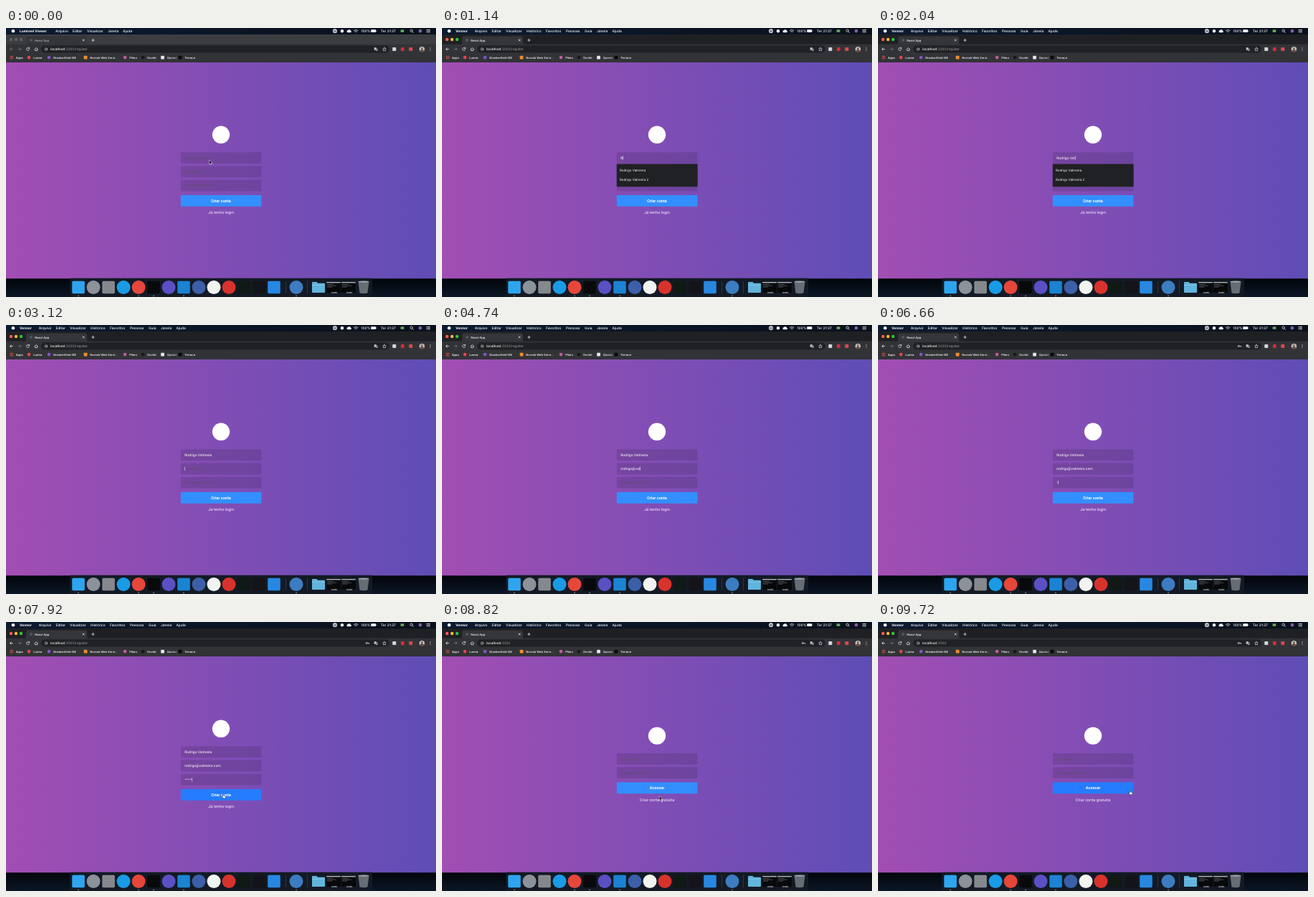
An HTML page for the animation above (9780 ms loop, 600 by 375 pixels).

```html
<!DOCTYPE html>
<html lang="pt-BR">
<head>
<meta charset="utf-8">
<title>Cadastro</title>
<style>
  html, body { margin: 0; width: 100%; height: 100%; overflow: hidden; background: #0b1120; }
  svg { display: block; width: 100vw; height: 100vh; }
  text { font-family: Inter, sans-serif; white-space: pre; text-rendering: geometricPrecision; fill: #fff; }
  .menu text { font-size: 4.8px; font-weight: 500; }
  .menu .app { font-weight: 700; }
  .tiny { font-size: 4.05px; font-weight: 500; }
  .line { fill: none; stroke: #e6e7ea; stroke-width: .75; stroke-linecap: round; stroke-linejoin: round; }
  .dim { stroke: #77797d; }
  .strip { fill: #1f2023; }
  .idle .strip { fill: #3c3d41; }
  .idle .light { fill: #5d5f63; }
  .idle .back { stroke: #77797d; }
  .idle .title { fill: #b4b6ba; }
  .page text { font-family: Roboto, sans-serif; font-size: 5px; }
  .page .hint { fill: #5b4f6d; }
  .page .btn { font-size: 5.6px; font-weight: 700; text-anchor: middle; }
  .page .link { font-size: 5.7px; text-anchor: middle; opacity: .9; }
  .page .item { font-family: Inter, sans-serif; font-size: 4.5px; }
  .hide { display: none; }
</style>
</head>
<body>
<svg viewBox="0 0 600 375" preserveAspectRatio="none">
  <defs>
    <linearGradient id="purple">
      <stop offset="0" stop-color="#a24eb3"/>
      <stop offset="1" stop-color="#5f4db6"/>
    </linearGradient>
    <linearGradient id="sky">
      <stop offset="0" stop-color="#0c1a30"/>
      <stop offset="1" stop-color="#0a101c"/>
    </linearGradient>
    <linearGradient id="night" x2="0" y2="1">
      <stop offset="0" stop-color="#03060b"/>
      <stop offset="1" stop-color="#0b1626"/>
    </linearGradient>
  </defs>
  <rect width="600" height="10" fill="url(#sky)"/>
  <rect y="349" width="600" height="26" fill="url(#night)"/>

  <g class="menu">
    <circle cx="10" cy="4.2" r="2.3" fill="#fff"/>
    <g id="menuBack"></g>
    <g id="menuFront"></g>
    <circle cx="459" cy="4.2" r="2.3" fill="none" stroke="#fff" stroke-width="1.1"/>
    <circle cx="459" cy="4.2" r=".9" fill="#fff"/>
    <circle cx="469" cy="4.2" r="2.2" fill="#fff"/>
    <path d="M477 6.3a1.5 1.5 0 0 1 .1-3 2.1 2.1 0 0 1 3.9.5 1.3 1.3 0 0 1 0 2.5z" fill="#fff"/>
    <path class="line" d="M485.4 3.4q2.8-2.4 5.6 0M486.5 4.8q1.7-1.4 3.4 0M488.2 6.1v.1"/>
    <text x="495.5" y="5.9">100%</text>
    <rect x="509.3" y="2.3" width="6.8" height="3.7" rx=".8" fill="#fff"/>
    <rect x="516.5" y="3.5" width=".7" height="1.4" fill="#fff"/>
    <text x="523" y="5.9">Ter 21:37</text>
    <rect x="550.5" y="2.2" width="5" height="3.9" rx=".5" fill="#249a4a"/>
    <path d="M553 2.6l2 1.5-2 1.6-2-1.6z" fill="#f2d53c"/>
    <circle cx="553" cy="4.15" r=".8" fill="#29498f"/>
    <path class="line" d="M567.3 3.7a1.7 1.7 0 1 1-3.4 0 1.7 1.7 0 1 1 3.4 0M566.9 5l1.6 1.6"/>
    <circle cx="578" cy="4.2" r="2.4" fill="#7d5fa9"/>
    <path class="line" d="M587 2.5h4.6M587 4.2h4.6M587 5.9h4.6"/>
  </g>

  <g id="browser">
    <path class="strip" d="M0 23V11q0-2 2-2h596q2 0 2 2v12z"/>
    <path d="M26 23q2 0 2-2v-7q0-2.5 2.5-2.5h80q2.5 0 2.5 2.5v7q0 2 2 2z" fill="#35363a"/>
    <circle class="light" cx="7" cy="16" r="2.2" fill="#ff5d55"/>
    <circle class="light" cx="14" cy="16" r="2.2" fill="#fdbd2e"/>
    <circle class="light" cx="21" cy="16" r="2.2" fill="#29c941"/>
    <circle cx="35" cy="17" r="2.1" fill="#50565e"/>
    <text class="tiny title" x="40.2" y="18.5">React App</text>
    <path class="line" d="M107 15.8l2.3 2.3M109.3 15.8l-2.3 2.3M119.6 17h3.6M121.4 15.2v3.6"/>
    <rect y="22.6" width="600" height="25.6" fill="#323337"/>
    <rect x="49" y="24.5" width="486" height="10" rx="5" fill="#202124"/>
    <path class="line back" d="M9.5 29.5H5.6M7.3 27.7l-1.8 1.8 1.8 1.8"/>
    <path class="line dim" d="M17 29.5h3.9M19.2 27.7l1.8 1.8-1.8 1.8"/>
    <path class="line" d="M40 29.6l2.2-2 2.2 2M40.7 29.4v2.2h3v-2.2"/>
    <path class="line" d="M32.2 28.2a2 2 0 1 0 .3 1.9M32.6 27.2v1.4h-1.4"/>
    <circle class="line" cx="56" cy="29.6" r="1.8" style="stroke-width:.5"/>
    <path class="line" style="stroke-width:.5" d="M56 29.5v.9M56 28.6v.1"/>
    <text x="62" y="31.3" font-size="4.7" font-weight="500">localhost<tspan id="path" fill="#9b9ea3" font-weight="400"></tspan></text>
    <path id="key" class="line" d="M504.4 29.5a1.1 1.1 0 1 1-2.2 0 1.1 1.1 0 1 1 2.2 0h2.2v1"/>
    <rect x="513.7" y="27.2" width="3.2" height="3.6" rx=".4" fill="#c4c7cb"/>
    <rect x="515.8" y="28.5" width="3" height="3.5" rx=".4" fill="#83878d"/>
    <path class="line" style="stroke-width:.6" d="M528 27.2l.75 1.6 1.75.2-1.3 1.2.35 1.8-1.55-.9-1.55.9.35-1.8-1.3-1.2 1.75-.2z"/>
    <rect x="539.3" y="27" width="5" height="5" rx=".8" fill="#d3d8dc"/>
    <rect x="551" y="27" width="4.6" height="5" rx=".8" fill="#dc2a36"/>
    <rect x="562.3" y="27" width="5" height="5" rx=".8" fill="#d44a50"/>
    <circle cx="580.4" cy="29.6" r="3.7" fill="#c9c4c1"/>
    <circle cx="580.4" cy="28.6" r="1.3" fill="#65483f"/>
    <path d="M577.6 32q.3-2 2.8-2t2.8 2q-2.8 2.6-5.6 0z" fill="#65483f"/>
    <path class="line" style="stroke-width:1" d="M592 27.7v.01M592 29.6v.01M592 31.5v.01"/>
    <g id="marks"></g>
  </g>

  <g class="page">
    <rect y="48" width="600" height="301.3" fill="url(#purple)"/>
    <g id="signup"></g>
    <g id="login"></g>
    <rect id="caret" width=".5" height="5.4" fill="#fff"/>
    <g id="drop">
      <rect x="243.7" y="189.5" width="113" height="31.7" rx="1.2" fill="#202124"/>
      <text class="item" x="248" y="200.3">Rodrigo Valmeira</text>
      <text class="item" x="248" y="213.1">Rodrigo Valmeira 2</text>
    </g>
  </g>

  <g id="dock">
    <rect x="89" y="348.8" width="422" height="28" rx="2" fill="#131a25"/>
    <path d="M390.5 353v17M420.5 353v17" stroke="#47505d" stroke-width=".5"/>
  </g>

  <g id="arrow">
    <path d="M0 0v6l1.4-1.2.9 2 .9-.4-.9-1.9h1.9z" fill="#000" stroke="#fff" stroke-width=".5"/>
  </g>
  <g id="hand">
    <path d="M-.7-2.4q.7-.9 1.3 0v1.9l2 .4q.8.2.7 1l-.5 2.3h-3.2l-1.7-2.4q.3-.8 1.4.1z" fill="#fff" stroke="#111" stroke-width=".5"/>
  </g>
</svg>
<script>
const LOOP = 9780, STEP = 60;
const $ = id => document.getElementById(id);

function add(parent, tag, attrs, label) {
  const el = document.createElementNS('http://www.w3.org/2000/svg', tag);
  for (const k in attrs) el.setAttribute(k, attrs[k]);
  if (label !== undefined) el.textContent = label;
  return parent.appendChild(el);
}

function icon(parent, round, x, y, r, fill) {
  if (round) add(parent, 'circle', { cx: x, cy: y, r, fill });
  else add(parent, 'rect', { x: x - r, y: y - r, width: 2 * r, height: 2 * r, rx: r / 5, fill });
}

function menu(id, items) {
  items.forEach(([x, label], i) =>
    add($(id), 'text', { x, y: 5.9, class: i ? '' : 'app' }, label));
}
menu('menuBack', [[19, 'Lumireel Viewer'], [69, 'Arquivo'], [93, 'Editar'],
  [113, 'Visualizar'], [142, 'Janela'], [163, 'Ajuda']]);
menu('menuFront', [[19, 'Vennor'], [45.7, 'Arquivo'], [69.5, 'Editar'], [89, 'Visualizar'],
  [118, 'Histórico'], [145, 'Favoritos'], [173, 'Pessoas'], [199, 'Guia'], [216, 'Janela'], [237.5, 'Ajuda']]);

// Bookmarks
for (let i = 0; i < 9; i++)
  add($('marks'), 'rect', { x: 5.8 + i % 3 * 1.6, y: 38.9 + (i / 3 | 0) * 1.6,
    width: 1.1, height: 1.1, fill: ['#e2574c', '#d9684f', '#c9504b'][i % 3] });
add($('marks'), 'text', { class: 'tiny', x: 13.7, y: 42.6 }, 'Apps');
[[32, 1, '#e0464d', 'Lumra'], [60, 1, '#8154c8', 'Brackenfield IDE'], [111, 0, '#f08b2c', 'Norvak Web Servi...'],
 [166, 1, '#c05c9d', 'Plimo'], [191, 1, '#17181a', 'Dovlet'], [218.5, 0, '#dfe8f2', 'Quorvi'],
 [243, 0, '#08090a', 'Terrace']].forEach(([x, round, fill, label]) => {
  icon($('marks'), round, x, 41.1, 2.4, fill);
  add($('marks'), 'text', { class: 'tiny', x: x + 6.2, y: 42.6 }, label);
});

// Dock
[[101, 0, '#2fa4ee'], [122, 1, '#8b929a'], [143, 0, '#85898e'], [164, 1, '#1a9be6'], [185, 1, '#e6473b'],
 [206, 0, '#08090b'], [227, 1, '#5b4fc4'], [248, 0, '#1b83d2'], [269, 1, '#3c5fa8'], [290, 1, '#f2f4f1'],
 [311, 1, '#d8322c'], [332, 0, '#111915'], [353, 0, '#15131a'], [374, 0, '#2887e0'], [405, 1, '#3d7cc0']]
  .forEach(([x, round, fill]) => icon($('dock'), round, x, 361.5, round ? 9.5 : 8.8, fill));
[101, 185, 206, 248, 405].forEach(x => icon($('dock'), 1, x, 373.4, .7, '#d5dae0'));
add($('dock'), 'path', { d: 'M427 355q0-1 1-1h5.5l1.5 1.7h9q1 0 1 1V368q0 1-1 1h-16q-1 0-1-1z', fill: '#62b4dc' });
add($('dock'), 'path', { d: 'M427 358.4h18', stroke: '#83cbea', 'stroke-width': .8 });
[457, 478].forEach(x => {
  add($('dock'), 'rect', { x: x - 10, y: 354, width: 20, height: 15, rx: .6, fill: '#08090b' });
  add($('dock'), 'rect', { x: x - 10, y: 354, width: 20, height: 1.4, rx: .6, fill: '#a9adb2' });
  add($('dock'), 'path', { d: `M${x - 9} 357.5h9m-9 1.8h13m-13 1.8h7`, stroke: '#858b90', 'stroke-width': .5 });
  add($('dock'), 'text', { x: x + 1, y: 369.5, 'font-size': 3.6, 'text-anchor': 'middle' }, 'node');
});
add($('dock'), 'path', { d: 'M491.5 353.5h15l-2 16q-5.5 1.5-11 0z', fill: '#666d75' });
add($('dock'), 'ellipse', { cx: 499, cy: 353.7, rx: 7.5, ry: 1.3, fill: '#9aa0a7' });

// Builds one form; returns its fields and button
function form(id, top, hints, button, link) {
  const g = $(id);
  const box = { x: 243.8, width: 112.6, height: 15.8, rx: 1.2 };
  icon(g, 1, 300, top - 24.4, 12.2, '#fff');
  const fields = hints.map((hint, i) => {
    const y = top + i * 19.3;
    add(g, 'rect', { ...box, y, fill: '#000', 'fill-opacity': .12 });
    return {
      y,
      hint: add(g, 'text', { class: 'hint', x: 249.2, y: y + 9.6 }, hint),
      text: add(g, 'text', { x: 249.2, y: y + 9.6 }, '')
    };
  });
  const y = top + hints.length * 19.3 + 1.9;
  const btn = add(g, 'rect', { ...box, y });
  add(g, 'text', { class: 'btn', x: 300, y: y + 9.5 }, button);
  add(g, 'text', { class: 'link', x: 300, y: y + 26.4 }, link);
  return { fields, btn, top: y, bottom: y + box.height };
}
const signup = form('signup', 173.2, ['Nome Completo', 'Seu e-mail', 'Sua senha secreta'], 'Criar conta', 'Já tenho login');
const login = form('login', 183, ['Seu e-mail', 'Sua senha secreta'], 'Acessar', 'Criar conta gratuita');

// When each field gets focus, its first key and the gap between keys
const typing = [
  { focus: 480, start: 1080, gap: 95, value: 'Rodrigo Valmeira' },
  { focus: 2880, start: 3540, gap: 120, value: 'rodrigo@valmeira.com' },
  { focus: 6180, start: 6600, gap: 170, value: '••••••' }
];
const ACTIVE = 480, WAKE = 7260, SENT = 8640;

// Pointer stops: time, x, y
const stops = [[0, 283.7, 184], [WAKE, 283.7, 184], [7860, 303.3, 242.6],
  [8880, 303.3, 242.6], [9600, 351.8, 237.6], [LOOP, 351.8, 237.6]];

const show = (el, on) => el.classList.toggle('hide', !on);
const ease = u => u * u * (3 - 2 * u);

function pointer(t) {
  const i = stops.findIndex((s, n) => n && t <= s[0]);
  const [t0, x0, y0] = stops[i - 1], [t1, x1, y1] = stops[i];
  const u = ease((t - t0) / (t1 - t0));
  return [x0 + (x1 - x0) * u, y0 + (y1 - y0) * u];
}

function drawFields(t) {
  let caretOn = false;
  typing.forEach((k, i) => {
    const f = signup.fields[i];
    const count = t < k.start ? 0 : Math.min(k.value.length, 1 + Math.floor((t - k.start) / k.gap));
    f.text.textContent = k.value.slice(0, count);
    show(f.hint, !count);
    const end = i < 2 ? typing[i + 1].focus : SENT;
    if (t < k.focus || t >= end) return;
    const last = count ? k.start + (count - 1) * k.gap : k.focus;
    caretOn = (t - last) % 1060 < 530;
    $('caret').setAttribute('x', 249.2 + (count ? f.text.getComputedTextLength() + .2 : 0));
    $('caret').setAttribute('y', f.y + 5.1);
  });
  show($('caret'), caretOn);
}

function draw(now) {
  const t = Math.floor(now % LOOP / STEP) * STEP;
  const front = t >= ACTIVE, sent = t >= SENT;
  show($('menuBack'), !front);
  show($('menuFront'), front);
  $('browser').classList.toggle('idle', !front);
  show($('key'), t >= typing[2].start);
  $('path').textContent = sent ? ':3000' : ':3000/register';
  show($('signup'), !sent);
  show($('login'), sent);
  show($('drop'), t >= typing[0].start && t < typing[1].focus);
  drawFields(t);

  const [x, y] = pointer(t);
  const page = sent ? login : signup;
  const over = y >= page.top && y < page.bottom;
  page.btn.setAttribute('fill', over ? '#257cff' : '#338fff');
  for (const id of ['arrow', 'hand']) $(id).setAttribute('transform', `translate(${x} ${y})`);
  show($('hand'), over);
  show($('arrow'), !over && (t < typing[0].start || t >= WAKE));
}

function tick() {
  draw(performance.now());
  requestAnimationFrame(tick);
}
tick();
</script>
</body>
</html>
```
